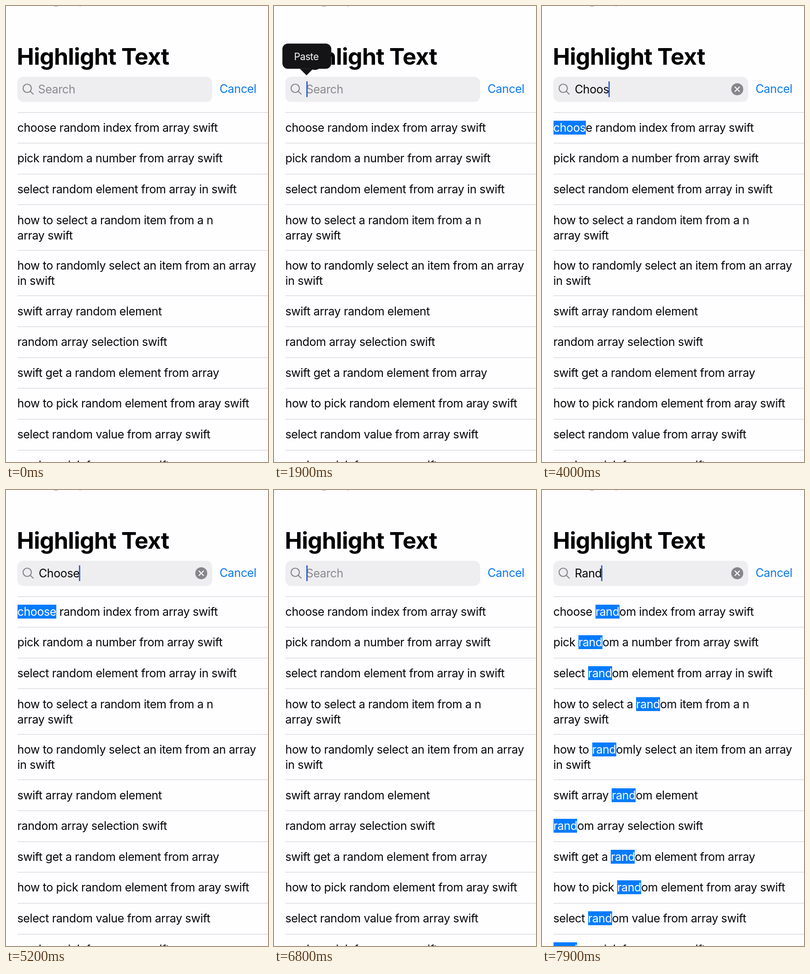
Animation of 568 by 986 pixels, one loop 8 s. Source, as an HTML page:

```html
<!DOCTYPE html>
<html lang="en">
<head>
<meta charset="utf-8">
<title>Highlight Text</title>
<style>
  html, body { margin: 0; width: 100%; height: 100%; overflow: hidden; }
  body {
    position: relative; background: #fefdff; color: #060507;
    font: 25px/33px Inter, sans-serif; font-optical-sizing: none;
    letter-spacing: -.39px; white-space: pre;
  }
  svg, #rows, #query { position: absolute; }
  svg { left: 0; top: 0; width: 568px; height: 986px; }
  .title { font-size: 50px; font-weight: 700; letter-spacing: -.7px; }
  .paste { font-size: 21px; fill: #fff; }
  #rows { left: 24.5px; right: 0; top: 229.5px; }
  .row { box-sizing: border-box; height: 66.65px; padding-top: 16.1px; border-top: 1px solid #cccbcf; }
  .row.tall { height: 98.5px; }
  mark { background: #047bff; color: #fff; }
  #query { left: 71px; top: 163px; height: 34px; line-height: 34px; display: flex; }
  #caret { width: 3px; height: 34px; margin-left: -1.5px; background: #3865d8; }
</style>
</head>
<body>
<div id="rows"></div>
<svg viewBox="0 0 568 986">
  <path d="M104 .4h8M159.500 .4h2" stroke="#77767a" stroke-width=".8"/>
  <text class="title" x="23.500" y="127.300">Highlight Text</text>
  <rect x="24.500" y="153" width="422.500" height="54.500" rx="13" fill="#eeedf0"/>
  <g fill="none" stroke="#858489" stroke-width="2.200" stroke-linecap="round">
    <circle cx="46" cy="178" r="9"/>
    <path d="M52.500 184.500L59 190.500"/>
  </g>
  <text id="hint" x="69.500" y="189" fill="#8a898e">Search</text>
  <g id="clear">
    <circle cx="423.300" cy="180" r="13" fill="#87868b"/>
    <path d="M418.500 175.200l9.600 9.600m0-9.600l-9.600 9.600" stroke="#fff" stroke-width="2.200" stroke-linecap="round"/>
  </g>
  <text x="463" y="187.500" fill="#0a78f0">Cancel</text>
</svg>
<div id="query"><span id="typed"></span><i id="caret"></i></div>
<svg id="popup" viewBox="0 0 568 986">
  <rect x="18.200" y="81.200" width="106" height="54.500" rx="12" fill="#141316"/>
  <path d="M56 135.500h29l-14.500 14.500z" fill="#141316"/>
  <text class="paste" x="43.500" y="116.500">Paste</text>
</svg>
<script>
  const LOOP = 8000;
  const phrases = [
    'choose random index from array swift',
    'pick random a number from array swift',
    'select random element from array in swift',
    'how to select a random item from a n\narray swift',
    'how to randomly select an item from an array\nin swift',
    'swift array random element',
    'random array selection swift',
    'swift get a random element from array',
    'how to pick random element from aray swift',
    'select random value from array swift',
    'random pick from array swift',
  ];
  // Each entry sets the query and restarts the caret blink.
  const edits = [
    [-680, ''], [900, ''],
    [2500, 'C'], [2700, 'Ch'], [3200, 'Cho'], [3400, 'Choo'], [4000, 'Choos'], [4200, 'Choose'],
    [5800, 'Choos'], [6000, 'Choo'], [6200, 'Cho'], [6400, 'Ch'], [6500, 'C'], [6800, ''],
    [7400, 'R'], [7500, 'Ra'], [7700, 'Ran'], [7900, 'Rand'],
  ];

  const el = id => document.getElementById(id);
  const ramp = (t, from, to) => Math.min(1, Math.max(0, (t - from) / (to - from)));

  function markFirst(text, query) {
    const at = query ? text.toLowerCase().indexOf(query.toLowerCase()) : -1;
    if (at < 0) return text;
    const end = at + query.length;
    return `${text.slice(0, at)}<mark>${text.slice(at, end)}</mark>${text.slice(end)}`;
  }

  function showQuery(query) {
    el('typed').textContent = query;
    el('hint').style.display = query ? 'none' : '';
    el('clear').style.display = query ? '' : 'none';
    el('rows').innerHTML = phrases.map(text =>
      `<div class="row${text.includes('\n') ? ' tall' : ''}">${markFirst(text, query)}</div>`).join('');
  }

  function caretOpacity(age) {
    const phase = age % 1000;
    return 1 - ramp(phase, 470, 600) + ramp(phase, 770, 1000);
  }

  let shown = null;
  function draw() {
    const t = performance.now() % LOOP;
    const [since, query] = edits.findLast(([time]) => time <= t);
    if (query !== shown) showQuery(shown = query);
    el('caret').style.opacity = caretOpacity(t - since);
    el('popup').style.opacity = ramp(t, 1050, 1300) - ramp(t, 2500, 2650);
    requestAnimationFrame(draw);
  }
  draw();
</script>
</body>
</html>
```
